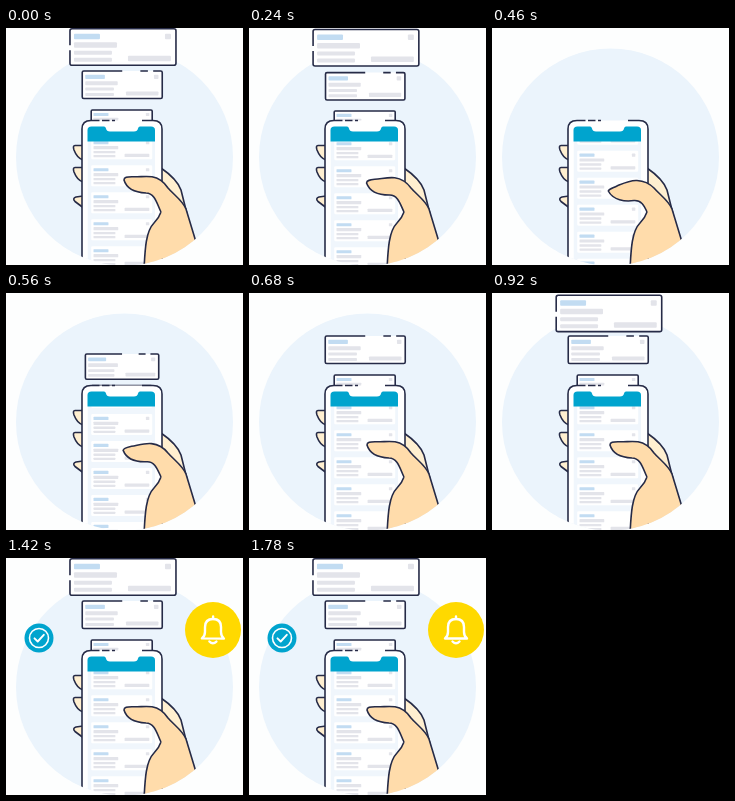
These frames come from a looping animation (237x237 px, 2580 ms). An HTML page with a canvas:

```html
<!DOCTYPE html>
<html lang="en">
<head>
<meta charset="utf-8">
<title>Phone notifications</title>
<style>
  html, body { margin: 0; height: 100%; overflow: hidden; background: #fdfefe; }
  canvas { display: block; width: 100vw; height: 100vh; }
</style>
</head>
<body>
<canvas id="stage"></canvas>
<script>
const SIZE = 237, LOOP = 2580;
const NAVY = '#262b47', TEAL = '#00a4ce', YELLOW = '#ffd900', SKY = '#ebf4fc',
      SKIN = '#ffdcab', CREAM = '#ffefd0', LABEL = '#c2dcf2', GREY = '#e3e4ea',
      PAPER = '#fdfefe';

const canvas = document.getElementById('stage');
const ctx = canvas.getContext('2d');
const density = Math.max(1, window.devicePixelRatio || 1);
canvas.width = canvas.height = SIZE * density;

const progress = (t, from, to) => Math.min(1, Math.max(0, (t - from) / (to - from)));
const mix = (a, b, k) => a + (b - a) * k;
const easeIn = u => u ** 2.6;
const easeOut = u => 1 - (1 - u) ** 3;
const easeInOut = u => u * u * (3 - 2 * u);
const backOut = u => 1 + 2.7 * (u - 1) ** 3 + 1.7 * (u - 1) ** 2;

// Scroll position -> [top edge, width] of a card that has left the phone
const CARD_TRACK = [[28, 0.8, 106], [44, 13.3, 102], [55, 43, 80], [71, 70, 70], [82, 82, 61]];

function cardPlace(v) {
  if (v >= 82) return [v, 61];
  let i = 0;
  while (i < 3 && v > CARD_TRACK[i + 1][0]) i++;
  const [v0, y0, w0] = CARD_TRACK[i], [v1, y1, w1] = CARD_TRACK[i + 1];
  const k = progress(v, v0, v1);
  return [mix(y0, y1, k), mix(w0, w1, k)];
}

function paint(path, fill, stroke, width = 1.6) {
  if (fill) { ctx.fillStyle = fill; ctx.fill(path); }
  if (stroke) { ctx.strokeStyle = stroke; ctx.lineWidth = width; ctx.stroke(path); }
}

function bar(x, y, w, h, color, radius = 0) {
  const path = new Path2D();
  path.roundRect(x, y, w, h, radius);
  paint(path, color);
}

function disc(r, color) {
  bar(-r, -r, 2 * r, 2 * r, color, r);
}

function card(y, width, dash) {
  const scale = width / 106;
  ctx.save();
  ctx.translate(114 - 0.472 * width, y);
  ctx.scale(scale, scale);
  const frame = new Path2D();
  frame.roundRect(0, 0, 106, 36.5, 2);
  ctx.setLineDash(dash || []);
  paint(frame, '#fff', dash && NAVY, 1.6 / scale);
  bar(4, 5, 26, 5.5, LABEL, 1);
  bar(4, 13.5, 43, 5.5, GREY, 1);
  bar(4, 22, 38, 4, GREY, 1);
  bar(4, 29, 38, 4, GREY, 1);
  bar(58, 27, 43, 5.5, GREY, 1);
  bar(95, 5, 6, 5.5, GREY, 1);
  ctx.restore();
}

const CARD_DASHES = [[258, 5, 999], [51, 24, 10, 7, 999], []];
const circle = new Path2D();
circle.arc(118.5, 129, 108.5, 0, Math.PI * 2);
const phone = new Path2D('M76 240V101Q76 92.5 85 92.5H147Q156 92.5 156 101V240');
const header = new Path2D('M81.5 113.5V102Q81.5 98.5 85.5 98.5H98Q99.5 98.5 100 100.5Q100.5 103.5 104 103.5H128Q131.5 103.5 132 100.5Q132.500 98.500 134 98.5H145Q149 98.5 149 102V113.5Z');
const palm = new Path2D('M155 140Q171 151 175 162L181 186L156 190Z');
const fingers = [
  'M77 117.5H69Q66.500 117.500 68 122Q71 130 77 132',
  'M77 139.500H69Q66.500 139.500 68 144Q71 152 77 154',
  'M77 168L70 169Q66 170.500 69 173.500L77 179.500'
].map(d => new Path2D(d));

// Bezier points of the thumb, resting and pulled down
const THUMB_UP = [
  [151, 176, 149, 165, 140, 165], [130, 164.5, 121, 162, 118, 152],
  [118, 149, 121, 148.8, 126, 148.8], [134, 149, 140, 148, 146, 148.8], [153, 150, 158, 154, 162, 160]];
const THUMB_DOWN = [
  [152, 177, 149, 172, 142, 172.5], [133, 174, 121, 172, 116.3, 163],
  [117, 161, 121, 160, 125, 158], [132, 155, 138, 152, 145, 152.5], [153, 153, 158, 156, 162, 160]];

function hand(pull) {
  const path = new Path2D();
  path.moveTo(155, 184);
  THUMB_UP.forEach((curve, i) =>
    path.bezierCurveTo(...curve.map((n, j) => mix(n, THUMB_DOWN[i][j], pull))));
  path.bezierCurveTo(168, 167, 177, 173, 180, 181);
  path.lineTo(190, 214);
  path.lineTo(190, 242);
  path.lineTo(138, 242);
  path.bezierCurveTo(139, 220, 140, 203, 148, 195);
  path.quadraticCurveTo(153, 190, 155, 184);
  paint(path, SKIN, NAVY);
}

function drawPhone(shift, pull) {
  ctx.save();
  ctx.clip(circle);
  paint(palm, CREAM, NAVY);
  fingers.forEach(f => paint(f, CREAM, NAVY));
  paint(phone, '#fff');

  ctx.save();
  ctx.beginPath();
  ctx.rect(81.5, 113, 67.5, 130);
  ctx.clip();
  bar(81.5, 113, 67.5, 130, '#f0f6fc');
  for (let i = -2; i < 7; i++) card(83.3 + 27 * i + shift, 61);
  ctx.restore();

  paint(header, TEAL);
  ctx.setLineDash([161.6, 2.5, 7.5, 2.5, 3, 27, 999]);
  paint(phone, null, NAVY);
  ctx.setLineDash([]);
  hand(pull);
  ctx.restore();
}

function badge(x, y, scale, draw) {
  if (scale <= 0) return;
  ctx.save();
  ctx.translate(x, y);
  ctx.scale(scale, scale);
  draw();
  ctx.restore();
}

function check() {
  disc(14.5, TEAL);
  paint(new Path2D('M9.500 0A9.500 9.500 0 1 1 -9.500 0A9.500 9.500 0 1 1 9.500 0'), null, '#fff', 1.6);
  paint(new Path2D('M-4.500 .3L-1.300 3.500L4.800 -3.200'), null, '#fff', 1.9);
}

function bell(angle) {
  disc(28, YELLOW);
  ctx.rotate(angle);
  paint(new Path2D('M-11 8.500H11Q8 6 8 2V-3C8 -8 5 -11 0 -11S-8 -8 -8 -3V2Q-8 6 -11 8.500Z'), null, '#fff', 2.4);
  paint(new Path2D('M0 -13.500V-11M-3.500 11.500Q0 15 3.500 11.500'), null, '#fff', 2.4);
}

function draw(t) {
  ctx.setTransform(canvas.width / SIZE, 0, 0, canvas.height / SIZE, 0, 0);
  ctx.lineJoin = 'round';
  bar(0, 0, SIZE, SIZE, PAPER);
  paint(circle, SKY);

  // Pull the stack into the phone, then flick it out again
  const pulling = t < 460;
  const shift = pulling ? 94.3 * easeIn(progress(t, 200, 440))
                        : 67.3 * (1 - easeOut(progress(t, 460, 680)));
  const pull = pulling ? easeInOut(progress(t, 200, 320))
                       : 1 - easeInOut(progress(t, 460, 660));
  const rise = easeOut(progress(t, 780, 1020));
  const places = [pulling ? 28 + shift : 55 - 27 * rise, 55 + shift, 82 + shift];
  ctx.lineCap = 'butt';
  places.forEach((v, i) => {
    const hidden = i === 0 && !pulling && rise === 0;
    if (v < 95 && !hidden) card(...cardPlace(v), CARD_DASHES[i]);
  });
  drawPhone(shift, pull);

  ctx.lineCap = 'round';
  const ring = progress(t, 1420, 1780);
  const swing = 0.22 * Math.sin(ring * Math.PI * 4) * (1 - ring);
  if (t > 980) badge(33, 80, backOut(progress(t, 980, 1100)), check);
  if (t > 1090) badge(207, 72, backOut(progress(t, 1090, 1210)), () => bell(swing));
}

const start = performance.now();
function tick() {
  draw((performance.now() - start) % LOOP);
  requestAnimationFrame(tick);
}
tick();
</script>
</body>
</html>
```
